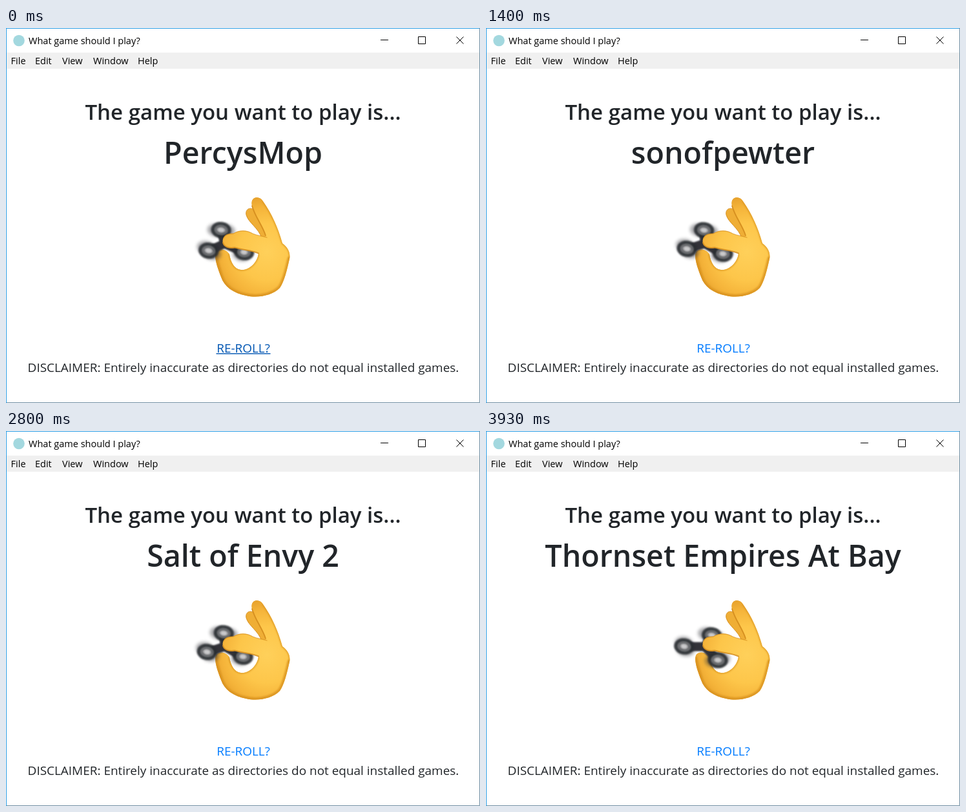
An HTML page for the animation above (3990 ms loop, 734 by 580 pixels).

```html
<!DOCTYPE html>
<html lang="en">
<head>
<meta charset="utf-8">
<title>What game should I play?</title>
<style>
html, body { margin: 0; width: 100%; height: 100%; overflow: hidden; background: #fff; }
svg { display: block; width: 734px; height: 580px; }
text { font-family: "Open Sans", "Noto Sans", sans-serif; fill: #212529; }
.bar text { font-size: 14.5px; fill: #000; }
.mid { text-anchor: middle; font-size: 18.95px; }
.head { font-size: 33px; font-weight: 600; }
.name { font-size: 46.6px; font-weight: 600; }
.win { fill: none; stroke: #000; }
.crease { fill: none; stroke: #d68f1f; stroke-linecap: round; }
</style>
</head>
<body>
<svg viewBox="0 0 734 580">
  <defs>
    <radialGradient id="skin" gradientUnits="userSpaceOnUse" cx="404" cy="346" r="88">
      <stop offset="0" stop-color="#ffd05a"/>
      <stop offset=".5" stop-color="#fdc64a"/>
      <stop offset=".78" stop-color="#f5b43a"/>
      <stop offset="1" stop-color="#e59f2b"/>
    </radialGradient>
    <clipPath id="inside"><use href="#hand"/></clipPath>
    <filter id="soft" x="-60%" y="-60%" width="220%" height="220%">
      <feGaussianBlur stdDeviation="2.6"/>
    </filter>
    <filter id="fine" x="-60%" y="-60%" width="220%" height="220%">
      <feGaussianBlur stdDeviation="1.1"/>
    </filter>
  </defs>

  <rect width="734" height="580" fill="#fff"/>
  <rect x="1" y="38" width="732" height="25" fill="#f0f0f0"/>
  <g class="bar">
    <circle cx="20" cy="19.5" r="8.800" fill="#a3d8df"/>
    <text x="35" y="25">What game should I play?</text>
    <text x="7.6" y="56">File</text>
    <text x="45" y="56">Edit</text>
    <text x="87" y="56">View</text>
    <text x="135" y="56">Window</text>
    <text x="204" y="56">Help</text>
    <path class="win" d="M580 18.5H592M638.5 13.5H649.5V24.5H638.5ZM697.5 13.5L708.5 24.5M708.5 13.5L697.5 24.5"/>
  </g>

  <g id="page">
    <text class="mid head" x="367" y="142">The game you want to play is...</text>
    <text class="mid name" id="name" x="367" y="210"></text>

    <path fill="#efae36" stroke="#d68f1f" d="M372 289C370 278 381 276 387 284L414 328L396 325C391 309 375 301 372 289Z"/>
    <path id="hand" fill="url(#skin)" d="M380.500 273C379 260 393 259 398 268C412 288 421 308 428 333C436 339 441 347 439 357C435 375 431 392 424 402C412 414 390 418 372 414C352 410 338 400 333 385C328 372 322 356 325 347C328 340 341 341 346 350C348 363 354 373 364 374C378 375 390 361 391 348L393 334L402 322C396 304 384 290 380.500 273Z"/>
    <!-- Darker rim, kept within the hand -->
    <use href="#hand" clip-path="url(#inside)" style="fill:none" stroke="none"/>
    <g clip-path="url(#inside)">
      <path class="crease" stroke-width="7" filter="url(#fine)" opacity=".75" d="M324 352C326 365 330 375 333 385C338 400 352 410 372 414C390 418 412 414 424 402C431 392 435 375 439 357"/>
      <path class="crease" stroke-width="3" filter="url(#fine)" opacity=".7" d="M398 268C412 288 421 308 428 333C436 339 441 347 439 357M346 350C348 363 354 373 364 374C378 375 390 361 391 348"/>
    </g>
    <path class="crease" stroke-width="1.800" d="M381 275C385 291 397 305 402 321"/>

    <g id="spinner"></g>

    <path fill="url(#skin)" d="M335.500 329C336 320 345 318 352 318C361 312 373 312 382 318C393 323 400 321 408 326C424 336 416 358 400 362L391 348C382 344 368 344 354 340C345 342 335 338 335.500 329Z"/>
    <path class="crease" stroke-width="2" opacity=".85" d="M391 348.500C382 344 368 343.500 354 339.500C346 341 338 339 336 332"/>
    <path class="crease" stroke-width="1.300" opacity=".7" d="M337 325C339 319 346 318 352 318C361 312.500 373 312.500 382 318C391 322 397 321 404 324"/>

    <text class="mid" id="link" x="367.500" y="501.500">RE-ROLL?</text>
    <rect id="line" x="325.500" y="503" width="84" height="1.400" fill="#0056b3"/>
    <text class="mid" x="367.500" y="531.500">DISCLAIMER: Entirely inaccurate as directories do not equal installed games.</text>
  </g>

  <path d="M733.5 0V579.500H0" fill="none" stroke="#708fa2"/>
  <path d="M0 .5H733M.5 0V580" fill="none" stroke="#2f9fe6"/>
</svg>
<script>
const $ = id => document.getElementById(id);
const LOOP = 3990, TICK = 200 / 3;
const CX = 338.5, CY = 334.5;

// Each roll: first tick, name, a known tick with its angle, degrees per tick, tick of hovering
const rolls = [
  { from: 0, name: "PercysMop", at: 1, angle: 15, rate: 35.4, hover: 0 },
  { from: 14, name: "sonofpewter", at: 16, angle: 91, rate: 34.4, hover: 28 },
  { from: 32, name: "Salt of Envy 2", at: 36, angle: 56, rate: 34.4, hover: 43 },
  { from: 48, name: "Thornset Empires At Bay", at: 59, angle: 45, rate: 34.4, hover: 99 }
];
const isBlank = n => n === 13 || n === 30 || n === 31 || n === 47;

// Point on the tilted circle the weights travel along
function orbit(deg) {
  const a = deg * Math.PI / 180, c = Math.cos(a), s = Math.sin(a);
  return [CX + 32 * c - 3 * s, CY + 7 * c + 21 * s];
}

const ellipse = (rx, ry, look) => `<ellipse rx="${rx}" ry="${ry}" ${look}/>`;

function at(deg, shapes) {
  const [x, y] = orbit(deg);
  return `<g transform="translate(${x} ${y}) rotate(8)">${shapes}</g>`;
}

const weight = deg => at(deg, '<g filter="url(#fine)">' +
  ellipse(11.5, 8.2, 'fill="none" stroke="#2a2c31" stroke-width="8.5" opacity=".9"') +
  ellipse(9, 6.2, 'fill="none" stroke="#97989b" stroke-width="2" opacity=".75"') +
  ellipse(5, 3.4, 'fill="#fff" opacity=".6"') + "</g>");

const smear = deg => [-14, 14].map(d =>
  at(deg + d, ellipse(14, 10, 'fill="#34363b" opacity=".42" filter="url(#soft)"'))).join("");

function arm(deg) {
  const [x, y] = orbit(deg);
  return `<path d="M${CX} ${CY - 1}L${CX + (x - CX) * .72} ${CY + (y - CY) * .72}" stroke="#303238" stroke-width="14"/>`;
}

function spinner(deg) {
  const all = part => [0, 120, 240].map(d => part(deg + d)).join("");
  return all(smear) + `<g filter="url(#fine)">${all(arm)}</g>` + all(weight);
}

let last = -1;
function draw(t) {
  const n = Math.floor((t % LOOP + 3.5) / TICK);
  if (n === last) return;
  last = n;
  $("page").style.display = isBlank(n) ? "none" : "";
  const roll = rolls.filter(r => r.from <= n).pop();
  // The picture holds still at the start and just before the first reload
  const step = n < 13 ? Math.min(Math.max(n, 1), 11) : n;
  const hover = n >= roll.hover;
  $("name").textContent = roll.name;
  $("spinner").innerHTML = spinner(roll.angle + (step - roll.at) * roll.rate);
  $("link").style.fill = hover ? "#0056b3" : "#007bff";
  $("line").style.display = hover ? "" : "none";
}

const start = performance.now();
function frame() {
  draw(performance.now() - start);
  requestAnimationFrame(frame);
}
frame();
</script>
</body>
</html>
```
